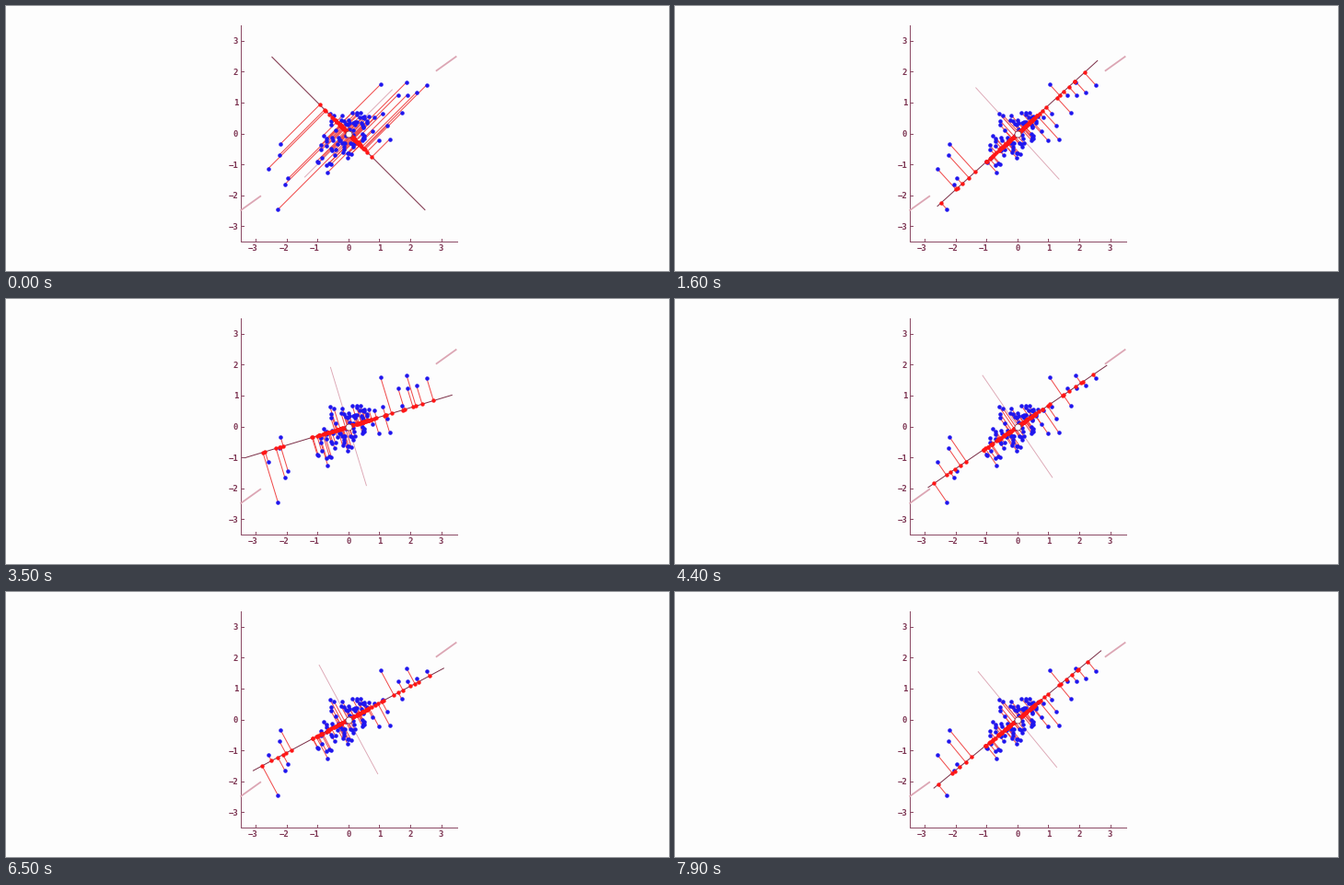
These frames come from a looping animation (720 by 288 pixels, 8000 ms). A matplotlib script:

```python
import numpy as np
import matplotlib.pyplot as plt
from matplotlib.animation import FuncAnimation
from matplotlib.collections import LineCollection

W, H, DPI = 720, 288, 100
PX = 72 / DPI
FRAMES, STEP_MS = 80, 100
CENTER = np.array([371.9, 138.5])
UNIT = 33.55
REST = 35.25  # main direction of the cloud, degrees

BG = "#fdfdfd"
AXIS = "#8c4c66"
TEXT = "#7c3452"
ROD = "#7c3048"
PALE = "#dca6b4"
RED = "#ff1616"
BLUE = "#2016ee"

# Outlying points that shape the cloud's edge
OUTLIERS = [(-2.6, -1.14), (-2.2, -0.34), (-2.24, -0.7), (-1.95, -1.46),
            (-2.06, -1.65), (-2.28, -2.46), (2.53, 1.57), (2.2, 1.33),
            (1.88, 1.66), (1.9, 1.25), (1.72, 0.67), (1.04, 1.59),
            (1.33, -0.19), (1.6, 1.25), (-0.67, -1.26), (-0.6, 0.65)]


def direction(degrees):
    a = np.radians(degrees)
    return np.array([np.cos(a), np.sin(a)])


def normal_to(v):
    return np.array([-v[1], v[0]])


def to_stage(xy):
    return CENTER + np.asarray(xy) * [UNIT, -UNIT]


def make_points(total=98, limit=2.1):
    """Outliers plus a truncated Gaussian cloud tilted to the main direction."""
    rng = np.random.default_rng(42)
    raw = rng.normal(size=(4 * total, 2))
    raw = raw[np.hypot(*raw.T) < limit][:total - len(OUTLIERS)]
    main = direction(REST)
    cloud = (raw * [0.8, 0.43]) @ np.array([main, normal_to(main)])
    return np.vstack([OUTLIERS, cloud])


def swing(start=-45.0, pull=1.605, damping=0.93):
    """Angles in degrees of a rod pulled to its rest angle by springs."""
    angle, speed, out = start, 0.0, []
    for _ in range(FRAMES):
        out.append(angle)
        torque = pull * np.sin(np.radians(2 * (REST - angle)))
        speed = (speed + torque) * damping
        angle += speed
    return out


points = make_points()
angles = swing()

fig = plt.figure(figsize=(W / DPI, H / DPI), dpi=DPI, facecolor=BG)
ax = fig.add_axes([0, 0, 1, 1])
ax.set_xlim(0, W)
ax.set_ylim(H, 0)
ax.axis("off")


def line(xs, ys, color, width, **kw):
    return ax.plot(xs, ys, color=color, lw=width * PX, **kw)[0]


def dots(color, size, z, **kw):
    return ax.plot([], [], "o", color=color, ms=size * PX, zorder=z, **kw)[0]


# Axes with inward ticks
LEFT, BOTTOM = 255.4, 256.4
line([LEFT, LEFT, 490], [21, BOTTOM, BOTTOM], AXIS, 1, snap=True)
label = dict(color=TEXT, family="DejaVu Sans Mono", fontsize=9 * PX, weight="bold")
for v in range(-3, 4):
    x, y = to_stage((v, v))
    line([x, x], [BOTTOM, BOTTOM - 3], AXIS, 1, snap=True)
    line([LEFT, LEFT + 3], [y, y], AXIS, 1, snap=True)
    text = str(v).replace("-", "\u2212")
    ax.text(x - (3 if v < 0 else 0), 264, text, ha="center", va="center", **label)
    ax.text(252, y, text, ha="right", va="center_baseline", **label)

# Marks of the main direction
for s in (-1, 1):
    ends = to_stage([(s * 3.5, s * 2.5), (s * 2.83, s * 2.02)])
    line(*ends.T, PALE, 1.8, solid_capstyle="butt")

cross = line([], [], PALE, 0.9, zorder=2)
rod = line([], [], ROD, 1, zorder=3)
springs = LineCollection([], colors="#f04a4a", linewidths=PX, zorder=4)
ax.add_collection(springs)
blue = dots(BLUE, 4.5, 5, mew=0)
blue.set_data(*to_stage(points).T)
red = dots(RED, 4.4, 6, mew=0)
pivot = dots(BG, 7, 7, mec=ROD, mew=0.8 * PX)
pivot.set_data(*to_stage([(0, 0)]).T)


def update(i):
    along = direction(angles[i])
    across = normal_to(along)
    shadow = np.outer(points @ along, along)
    rod.set_data(*to_stage([-3.5 * along, 3.5 * along]).T)
    cross.set_data(*to_stage([-2 * across, 2 * across]).T)
    springs.set_segments(np.stack([to_stage(points), to_stage(shadow)], axis=1))
    red.set_data(*to_stage(shadow).T)
    return cross, rod, springs, blue, red


anim = FuncAnimation(fig, update, frames=FRAMES, interval=STEP_MS,
                     repeat=True, repeat_delay=0, blit=False)
plt.show()
```
